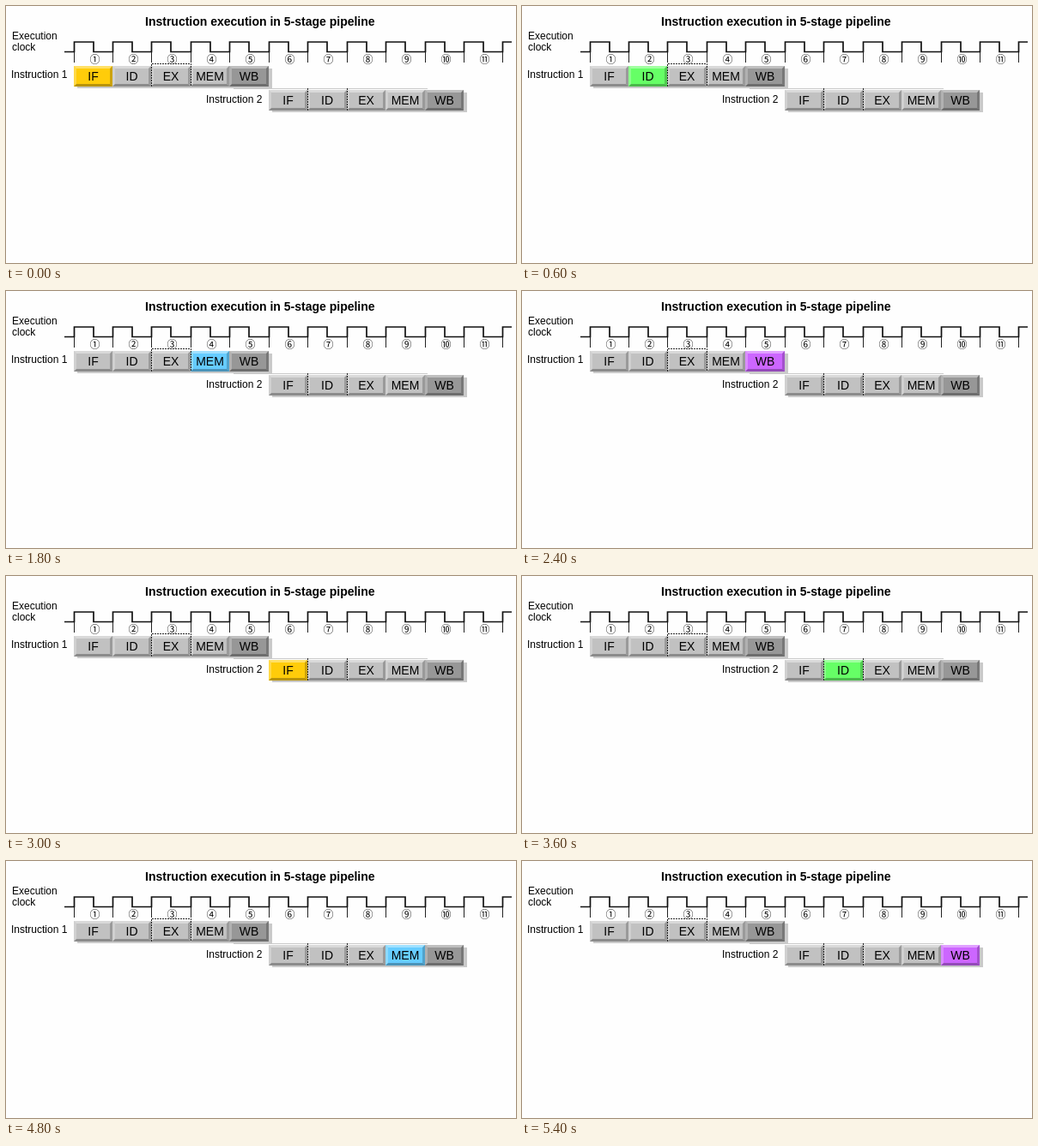
Write an HTML page with a canvas that moves like this. It is 594 px wide and 300 px high and loops after 6000 ms.

```html
<!DOCTYPE html>
<html lang="en">
<head>
<meta charset="utf-8">
<title>Pipeline</title>
<style>
  html, body { margin: 0; width: 100%; height: 100%; overflow: hidden; background: #fefefe; }
  canvas { display: block; }
</style>
</head>
<body>
<canvas id="stage" width="594" height="300"></canvas>
<script>
const ctx = document.getElementById('stage').getContext('2d');
const STEP = 600, LEFT = 79, PERIOD = 45.45, HEIGHT = 24;
const SANS = '"Liberation Sans", Arial, sans-serif';
const STAGES = [
  { name: 'IF', color: '#ffcc0a' },
  { name: 'ID', color: '#66ff66' },
  { name: 'EX', color: '#ff99cc' },
  { name: 'MEM', color: '#66ccff' },
  { name: 'WB', color: '#cc66ff' }
];
const edge = i => Math.floor(LEFT + i * PERIOD);

function text(str, x, y, font = '12px ' + SANS, align = 'left') {
  ctx.font = font;
  ctx.textAlign = align;
  ctx.fillStyle = '#000';
  ctx.fillText(str, x, y);
}

function polygon(color, ...points) {
  ctx.fillStyle = color;
  ctx.beginPath();
  points.forEach(([x, y]) => ctx.lineTo(x, y));
  ctx.fill();
}

function line(color, width, points, dash = []) {
  ctx.strokeStyle = color;
  ctx.lineWidth = width;
  ctx.setLineDash(dash);
  ctx.beginPath();
  points.forEach(([x, y]) => ctx.lineTo(x, y));
  ctx.stroke();
}

function clock() {
  const low = 53.5, high = 42, wave = [[68, low]];
  for (let i = 0; i < 12; i++) {
    const x = edge(i) + 0.5, fall = Math.min(x + 22.5, 589);
    wave.push([x, low], [x, high], [fall, high]);
    if (i < 11) {
      wave.push([fall, low]);
      text(String.fromCharCode(0x2460 + i), x + 24, 67, '500 12px "Noto Sans CJK JP", "DejaVu Sans", sans-serif', 'center');
    }
    line('#222', 1, [[x, low], [x, 66]]);
  }
  line('#111', 1.7, wave);
}

function cell(x, y, right, stage, active) {
  const bottom = y + HEIGHT, b = 3;
  polygon(active ? stage.color : stage.name === 'WB' ? '#979797' : '#c1c1c1',
    [x, y], [right, y], [right, bottom], [x, bottom]);
  polygon('rgba(255,255,255,.38)', [x, y], [right, y], [right - b, y + b], [x + b, y + b]);
  polygon('rgba(255,255,255,.25)', [x, y], [x + b, y + b], [x + b, bottom - b], [x, bottom]);
  polygon('rgba(0,0,0,.2)', [right, y], [right, bottom], [right - b, bottom - b], [right - b, y + b]);
  polygon('rgba(0,0,0,.28)', [x, bottom], [x + b, bottom - b], [right - b, bottom - b], [right, bottom]);
  text(stage.name, (x + right) / 2, y + 17, '14px ' + SANS, 'center');
}

function row(first, y, active) {
  const x = edge(first), right = edge(first + 5);
  ctx.fillStyle = '#cacaca';
  ctx.fillRect(x + 4, y + 3, right - x, HEIGHT - 1);
  STAGES.forEach((stage, i) =>
    cell(edge(first + i), y, edge(first + i + 1), stage, active === first + i));
}

function dotted(color, ...points) {
  line(color, 1, points, [2, 1]);
}

function draw(now) {
  const active = Math.floor(now / STEP) % 10;
  ctx.fillStyle = '#fefefe';
  ctx.fillRect(0, 0, 594, 300);

  text('Instruction execution in 5-stage pipeline', 162, 23, 'bold 14px ' + SANS);
  text('Execution', 7, 39);
  text('clock', 7, 52);
  text('Instruction 1', 6, 84);
  text('Instruction 2', 233, 113);
  clock();

  row(0, 70, active);
  line('#cacaca', 1, [[265, 96.5], [491, 96.5]]);
  row(5, 98, active);

  const dots = i => active === i ? '#5000a0' : '#222';
  dotted(dots(2), [169.5, 94], [169.5, 67.5], [215.5, 67.5], [215.5, 94]);
  dotted('#222', [351.5, 96], [351.5, 122]);
  dotted(dots(7), [397.5, 96], [397.5, 122]);
  requestAnimationFrame(draw);
}
draw(performance.now());
</script>
</body>
</html>
```
